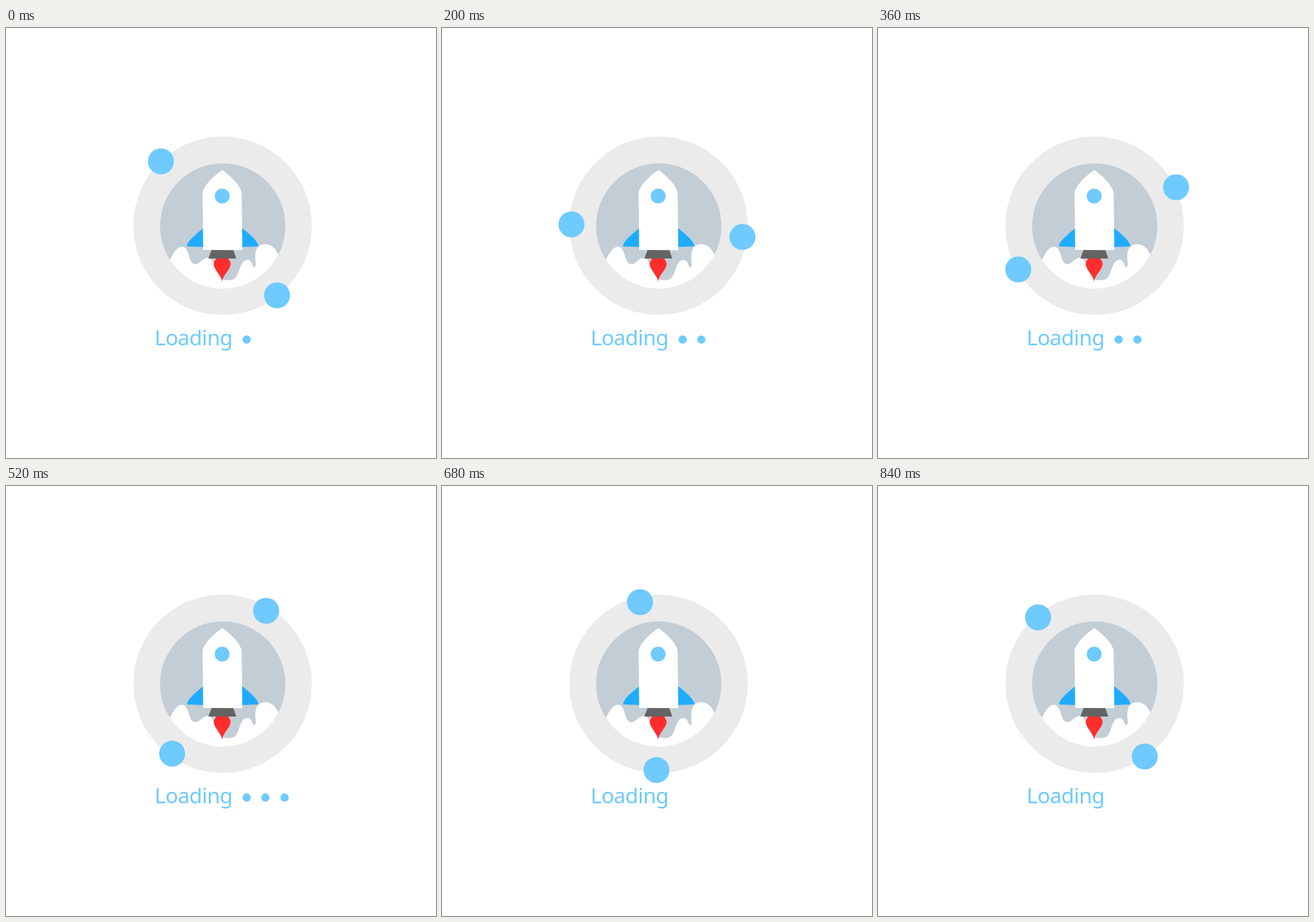
Write an HTML page that moves like this. It is 748x748 px and loops after 880 ms.

```html
<!DOCTYPE html>
<html lang="en">
<head>
<meta charset="utf-8">
<title>Loading</title>
<style>
  html, body { margin: 0; height: 100%; overflow: hidden; background: #fff; }
  svg { display: block; width: 100vw; height: 100vh; }
  text { font: 37px "Noto Sans", "Open Sans", sans-serif; letter-spacing: -.02em; }
</style>
</head>
<body>
<svg viewBox="0 0 748 748">
  <clipPath id="porthole"><circle cx="377" cy="344.5" r="109"/></clipPath>
  <circle cx="376.7" cy="344" r="155.2" fill="#ebebeb"/>
  <circle cx="377" cy="344.5" r="109" fill="#c3cdd6"/>
  <path clip-path="url(#porthole)" fill="#fff" d="M284 405C291 393 296 381 306 380.5
    C320 380 316 410 329 411C338 411 341 400 351 400C364 400 362 430 378 437
    C382 439 389 439 393 438C408 435 404 404 420 403.5C429 404 428 416 432 416
    C438 415 430 398 436 385C441 373 460 373 469 386Q473 391 476 399V460H280Z"/>
  <g id="rocket">
    <path fill="#ff2e2e" d="M366 400H386L390 407C394 418 378 427 376 441.5C374 427 358 418 362 407Z"/>
    <path fill="#646464" d="M358 385H395L400.5 401H352Z"/>
    <path fill="#1facff" d="M344 347.5C330 359 315 371 315 380L344 381ZM410 347.5C424 359 439 371 439 380L410 381Z"/>
    <path fill="#fff" d="M376.5 247C392 258 410 276 410 289L411 386.5L343 386L342 289C342 276 360 258 376.5 247Z"/>
    <circle cx="376" cy="292.4" r="12.9" fill="#6fcaff"/>
  </g>
  <g fill="#6fcaff">
    <circle class="moon" r="22.6"/>
    <circle class="moon" r="22.6"/>
    <text x="258.5" y="552">Loading</text>
    <circle class="dot" cx="418.6" cy="542" r="7.2"/>
    <circle class="dot" cx="451.2" cy="542" r="7.2"/>
    <circle class="dot" cx="484.6" cy="542" r="7.2"/>
  </g>
</svg>
<script>
  const STEP = 40, STEPS = 22;
  // Each key: step, x, y; straight moves in between.
  const paths = [
    [[0, 269.5, 232], [4, 220.5, 322], [9, 244, 420], [14, 300.2, 477], [18, 397.3, 499.7], [21, 464, 470.5]],
    [[0, 471.5, 465], [4, 523.7, 385], [9, 518.5, 277], [14, 436, 202], [18, 314, 202], [21, 278.5, 228.5]]
  ];
  const moons = document.querySelectorAll('.moon');
  const dots = document.querySelectorAll('.dot');
  const rocket = document.getElementById('rocket');

  function pointAt(keys, step) {
    const next = Math.max(1, keys.findIndex(key => key[0] >= step));
    const [s0, x0, y0] = keys[next - 1], [s1, x1, y1] = keys[next];
    const k = (step - s0) / (s1 - s0);
    return [x0 + (x1 - x0) * k, y0 + (y1 - y0) * k];
  }

  function draw(time) {
    const step = Math.floor(time / STEP) % STEPS;
    moons.forEach((moon, i) =>
      moon.setAttribute('transform', `translate(${pointAt(paths[i], step)})`));
    rocket.setAttribute('transform', `translate(0 ${step % 4 < 2 ? 0 : -2})`);
    dots.forEach((dot, i) =>
      dot.setAttribute('visibility', step >= i * 5 && step < 15 ? 'visible' : 'hidden'));
  }

  const start = performance.now();
  function tick() {
    draw(performance.now() - start);
    requestAnimationFrame(tick);
  }
  tick();
</script>
</body>
</html>
```
